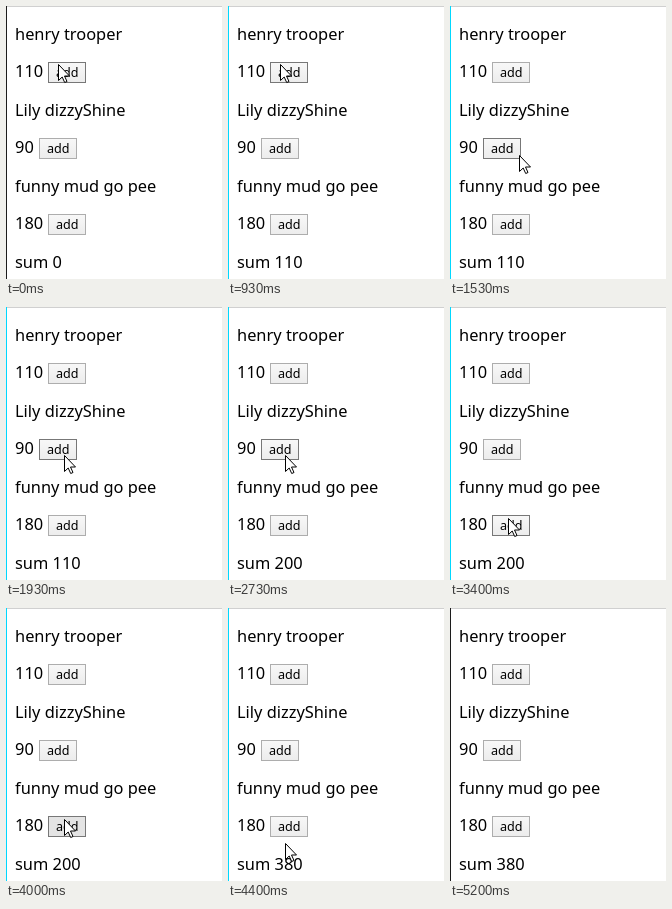
Animation, 216 px wide and 273 px high, one loop 5470 ms. Source, as an HTML page:

```html
<!DOCTYPE html>
<html lang="en">
<head>
<meta charset="utf-8">
<title>Vote counter</title>
<style>
  html, body { margin: 0; width: 100%; height: 100%; overflow: hidden; background: #fff; }
  svg { display: block; width: 216px; height: 273px; }
  text { font: 16.4px "Noto Sans", "Open Sans", sans-serif; fill: #000; }
  .button rect { fill: url(#face); stroke: #adadad; }
  .button text { font-size: 12.6px; }
  .button.hover rect { stroke: #777; }
  .button.pressed rect { fill: #e4e4e4; }

  #edge { fill: #1c1c1c; animation: edge 5470ms step-end infinite; }
  @keyframes edge {
    14.62% { fill: #00d8ff; }
    95.06% { fill: #1c1c1c; }
  }
</style>
</head>
<body>
<svg viewBox="0 0 216 273">
  <defs>
    <linearGradient id="face" x2="0" y2="1">
      <stop stop-color="#f8f8f8"/>
      <stop offset="1" stop-color="#ececec"/>
    </linearGradient>
  </defs>
  <rect width="216" height="273" fill="#fff"/>
  <rect width="216" height="1" fill="#d0d0d0"/>
  <rect id="edge" width="1" height="273"/>
  <g id="list"></g>
  <text id="sum" x="9" y="262">sum 0</text>
  <path id="cursor" d="M.5 .5V16.5L4.2 13 6.7 18.5 9 17.5 6.5 12H11.5Z" fill="#fff" stroke="#000"/>
</svg>
<script>
  const LOOP = 5470;
  const TICK = 200 / 3;
  const ROW = 76;
  const BUTTON = { width: 38, height: 21, top: 56 };

  const rows = [
    { name: 'henry trooper', points: 110, left: 42, down: 800, up: 930 },
    { name: 'Lily dizzyShine', points: 90, left: 33, down: 2400, up: 2600 },
    { name: 'funny mud go pee', points: 180, left: 42, down: 4000, up: 4130 }
  ];

  const linear = u => u;
  const easeOut = u => 1 - (1 - u) ** 2;
  const smooth = u => u * u * (3 - 2 * u);

  const home = { x: 52, y: 58 };
  const glides = [
    { start: 1200, end: 1533, x: 69, y: 149, ease: smooth },
    { start: 1533, end: 1600, x: 69, y: 161, ease: linear },
    { start: 1733, end: 2000, x: 57, y: 147, ease: easeOut },
    { start: 2667, end: 3400, x: 58, y: 211, ease: smooth },
    { start: 4267, end: 4667, x: 56, y: 283, ease: linear }
  ];

  const list = document.getElementById('list');
  const sum = document.getElementById('sum');
  const cursor = document.getElementById('cursor');

  list.innerHTML = rows.map(({ name, points, left }, i) => `
    <g transform="translate(0 ${i * ROW})">
      <text x="9" y="34">${name}</text>
      <text x="9" y="71">${points}</text>
      <g class="button" transform="translate(${left} ${BUTTON.top})">
        <rect x=".5" y=".5" width="${BUTTON.width - 1}" height="${BUTTON.height - 1}"/>
        <text x="8" y="15">add</text>
      </g>
    </g>`).join('');
  const buttons = list.querySelectorAll('.button');

  // The pointer is sampled 15 times a second, on 10 ms boundaries
  function pointer(t) {
    const sampled = Math.floor((t + 4) / TICK) * TICK;
    let { x, y } = home;
    for (const glide of glides) {
      const u = (sampled - glide.start) / (glide.end - glide.start);
      const k = glide.ease(Math.min(1, Math.max(0, u)));
      x += (glide.x - x) * k;
      y += (glide.y - y) * k;
    }
    return [Math.round(x), Math.round(y)];
  }

  function draw(t) {
    const [x, y] = pointer(t);
    cursor.setAttribute('transform', `translate(${x} ${y})`);
    let total = 0;
    rows.forEach(({ points, left, down, up }, i) => {
      const dx = x - left;
      const dy = y - BUTTON.top - i * ROW;
      const inside = dx >= 0 && dx < BUTTON.width && dy >= 0 && dy < BUTTON.height;
      buttons[i].classList.toggle('hover', inside);
      buttons[i].classList.toggle('pressed', t >= down && t < up);
      if (t >= up) total += points;
    });
    sum.textContent = `sum ${total}`;
  }

  const start = performance.now();
  function tick() {
    draw((performance.now() - start) % LOOP);
    requestAnimationFrame(tick);
  }
  tick();
</script>
</body>
</html>
```
